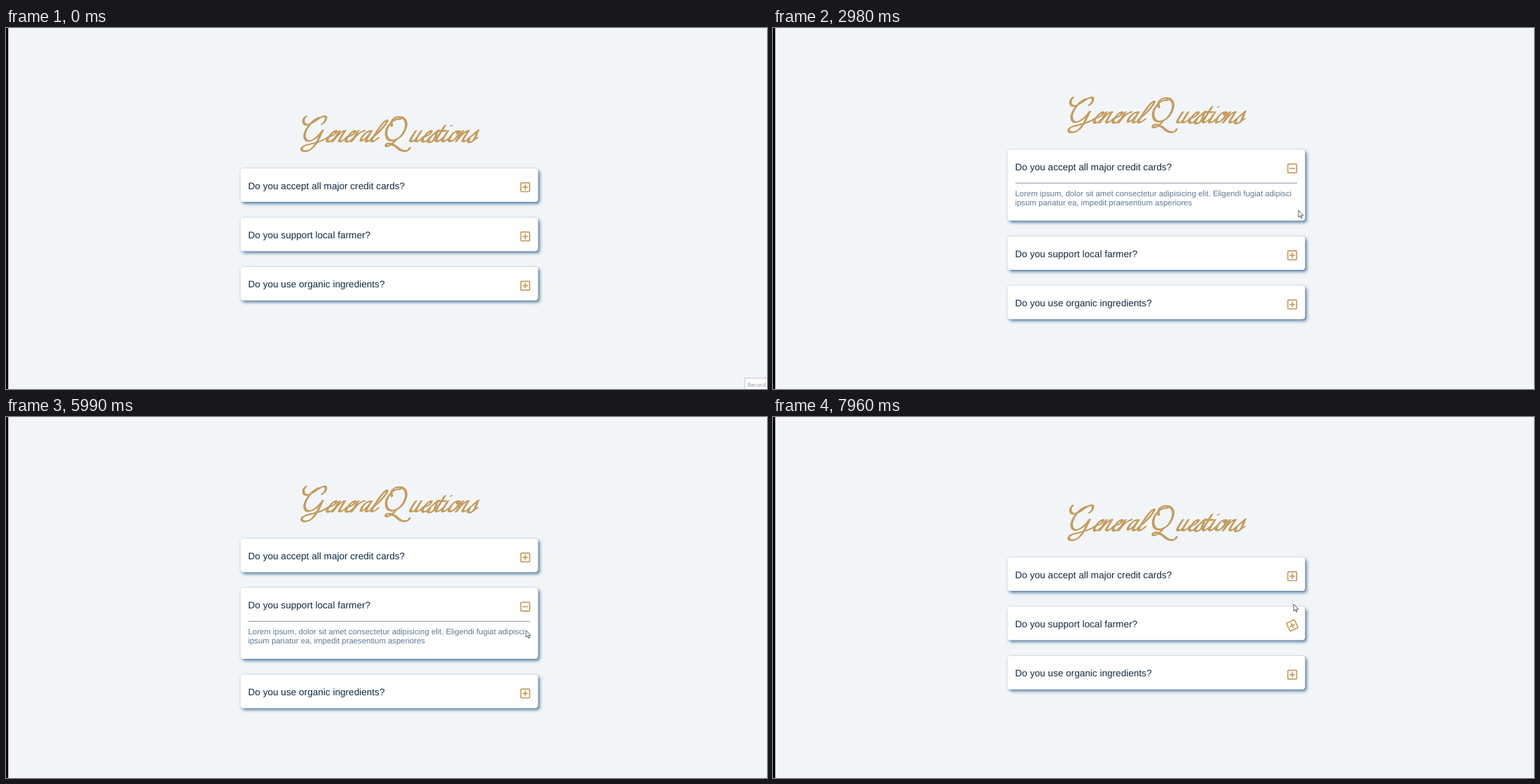
Animation, 1086 px wide and 515 px high, one loop 8000 ms. Source, as an HTML page:

```html
<!DOCTYPE html>
<html lang="en">
<head>
<meta charset="utf-8">
<title>General Questions</title>
<style>
  html, body { margin: 0; height: 100%; overflow: hidden; background: #f1f5f8; }
  svg { display: block; width: 100vw; height: 100vh; }
  text { font-family: "Liberation Sans", Arial, sans-serif; text-rendering: geometricPrecision; }
  .ask { font-size: 13.6px; fill: #102a42; }
  .answer text { font-size: 11.36px; fill: #5d7a98; }
  .answer path { stroke: #8b97a3; }
  .icon { fill: none; stroke: #c59d5f; stroke-width: 1.7; }
  #title { fill: none; stroke: #c59d5f; stroke-width: 1.4; stroke-linecap: round; stroke-linejoin: round; }
  #cursor path { fill: #fff; stroke: #333; stroke-width: .8; stroke-linejoin: round; }
  #press { fill: #ffff4a; mix-blend-mode: multiply; }
  #tag text { font: 8px "Open Sans", sans-serif; fill: #8d939b; }
</style>
</head>
<body>
<svg viewBox="0 0 1086 515">
  <defs>
    <filter id="shadow" x="-5%" y="-20%" width="110%" height="150%">
      <feDropShadow dx="0" dy="0" stdDeviation="1" flood-color="#3d5b78" flood-opacity=".25"/>
      <feDropShadow dx="2.5" dy="2.7" stdDeviation="2" flood-color="#4d7399" flood-opacity=".9"/>
    </filter>
    <g id="lettering"></g>
  </defs>
  <rect width="1086" height="515" fill="#f1f5f8"/>
  <rect width="3.2" height="515"/>
  <g id="title" role="img" aria-label="General Questions"></g>
  <g id="cards"></g>
  <g id="tag">
    <rect x="1054.5" y="499.5" width="40" height="20" fill="#fff" stroke="#c5cbdc"/>
    <text x="1058" y="512">Record</text>
  </g>
  <circle id="press" r="7.8"/>
  <g id="cursor">
    <path id="arrow" d="M0 0V9.8L2.2 7.8 3.8 11.3 5.3 10.6 3.8 7.2H6.8Z"/>
    <path id="hand" d="M-1 1Q0-.6 1 1V5L5 6Q6.3 6.4 6 8.5L4.6 13H-1L-4 8.5Q-4.2 6.4-2.4 7L-1 8.2Z"/>
  </g>
</svg>
<script>
const LOOP = 8000, GLIDE = 500, TURN = 300, PRESS = 170;
const $ = id => document.getElementById(id);
const clamp = v => Math.max(0, Math.min(1, v));
const ease = p => p * p * (3 - 2 * p);
const show = (el, on) => el.setAttribute('visibility', on ? 'visible' : 'hidden');
const move = (el, x, y, more = '') => el.setAttribute('transform', `translate(${x} ${y})${more}`);

// Script letters share a closing cup and are drawn upright, then slanted
const CUP = 'v9c0 6 4 7 7 0';
const GLYPHS = {
  e: [9, 'M1-6C9-7 9-14 6-14S0-1 5 0S9-3 11-5'],
  n: [15, `M2-14V0C3-9 6-14 8-14S9-12 9-14${CUP}`],
  r: [10, 'M2-14V0C3-9 6-14 10-14'],
  a: [14, `M9-13C4-16 1-9 2-4S7 0 9-10V-14${CUP}`],
  l: [8, 'M1-5C7-12 9-27 6-28S2-18 2-5c0 6 4 7 7 0'],
  u: [15, `M2-14v9c0 6 6 7 7 0v-9${CUP}`],
  s: [9, 'M1-5L6-15C6-9 10-5 8-1S0 0 2-3M7 0l4-5'],
  t: [8, 'M2-21v16c0 6 4 7 7 0M-2-14h9'],
  i: [8, `M2-14${CUP}M2-21h.1`],
  o: [11, 'M8-13C3-16 1-9 2-4S9 1 10-6S8-15 7-13s3 3 5 1']
};
const CAPITALS =
  'M428 126C422 131 424 139 431 138S447 127 453 126S457 133 451 137' +
  'M446 128C434 133 423 150 427 158S444 158 452 146C447 156 441 172 431 175S419 171 426 168S449 164 459 156' +
  'M563 130C553 128 540 142 543 154S563 160 569 146S567 126 559 127S548 135 551 140' +
  'M558 158C552 166 542 172 542 167S554 166 559 171S574 178 576 171';

function word(left, letters) {
  let x = 0;
  const paths = [...letters].map(c => {
    const [advance, d] = GLYPHS[c];
    x += advance;
    return `<path transform="translate(${x - advance})" d="${d}"/>`;
  });
  return `<g transform="translate(${left} 162) skewX(-32) scale(1.12 1.08)">${paths.join('')}</g>`;
}
$('lettering').innerHTML = `<path d="${CAPITALS}"/>` + word(454, 'eneral') + word(573, 'uestions');
// Copies along a slanted nib give thick downstrokes and thin upstrokes
$('title').innerHTML = [-1, -.5, 0, .5, 1]
  .map(k => `<use href="#lettering" x="${1.1 * k}" y="${-.5 * k}"/>`).join('');

const QUESTIONS = [
  'Do you accept all major credit cards?',
  'Do you support local farmer?',
  'Do you use organic ingredients?'
];
$('cards').innerHTML = QUESTIONS.map(q => `<g>
  <rect class="box" x="334.8" width="424.4" rx="4" fill="#fff" filter="url(#shadow)"/>
  <text class="ask" x="345.5" y="29.6">${q}</text>
  <g class="icon"><rect x="-6.3" y="-6.3" width="12.6" height="12.6" rx="1.2"/>
    <path d="M-4 0H4"/><path class="bar" d="M0-4V4"/></g>
  <g class="answer"><path d="M346 47.6H748"/>
    <text x="345.5" y="65.9">Lorem ipsum, dolor sit amet consectetur adipisicing elit. Eligendi fugiat adipisci</text>
    <text x="345.5" y="79">ipsum pariatur ea, impedit praesentium asperiores</text></g>
</g>`).join('');
const cards = [...$('cards').children].map(root => {
  const find = name => root.querySelector('.' + name);
  return { root, box: find('box'), icon: find('icon'), bar: find('bar'), answer: find('answer') };
});

const CLOSED = 47.5, EXTRA = 53.7, GAP = 22.7, ICON_X = 741, ICON_Y = 26.7;
const CLICKS = [2470, 5520, 7880];
// Pointer stops: arrival time, x, y
const STOPS = [
  [990, 952, 379], [2140, 744, 229], [2980, 750, 260], [3730, 742, 326], [4490, 753, 353],
  [5000, 742, 328], [6200, 742, 290], [6600, 741, 273], [7200, 740, 300], [7700, 743, 267]
];

function pointer(t) {
  let x = 1074, y = 530;
  for (const [end, toX, toY] of STOPS) {
    const k = ease(clamp((t - end) / GLIDE + 1));
    x += (toX - x) * k;
    y += (toY - y) * k;
  }
  return [x, y];
}

// The first click opens card 0, the second card 1, the third closes it
const openCard = t => [-1, 0, 1, -1][CLICKS.filter(c => t >= c).length];
const lift = open => open < 0 ? 0 : -EXTRA / 2;
const cardTop = (i, open) =>
  200.5 + lift(open) + i * (CLOSED + GAP) + (open >= 0 && i > open ? EXTRA : 0);

function hovers(i, t) {
  const [x, y] = pointer(t);
  const iconY = cardTop(i, openCard(t)) + ICON_Y;
  return Math.max(Math.abs(x - ICON_X), Math.abs(y - iconY)) < 12;
}

// A linear transition equals the share of the last TURN ms spent hovering
function turn(i, t) {
  const samples = 60;
  let hits = 0;
  for (let k = 0; k < samples; k++) hits += hovers(i, t - TURN * k / samples);
  return 90 * hits / samples;
}

function draw(t) {
  const open = openCard(t);
  const turns = cards.map((_, i) => turn(i, t));
  move($('title'), 0, lift(open));
  cards.forEach((card, i) => {
    const isOpen = i === open;
    move(card.root, 0, cardTop(i, open));
    card.box.setAttribute('height', CLOSED + (isOpen ? EXTRA : 0));
    move(card.icon, ICON_X, ICON_Y, ` rotate(${turns[i]})`);
    show(card.bar, !isOpen);
    show(card.answer, isOpen);
  });

  const [x, y] = pointer(t), hand = turns.includes(90);
  $('tag').setAttribute('opacity', t < 70 ? 1 : t < 120 ? .5 : 0);
  move($('cursor'), x, y);
  move($('press'), x - 1.5, y - 2);
  show($('press'), CLICKS.some(c => t >= c - PRESS && t < c));
  show($('hand'), hand);
  show($('arrow'), !hand);
}

const start = performance.now();
function tick() {
  draw((performance.now() - start) % LOOP);
  requestAnimationFrame(tick);
}
tick();
</script>
</body>
</html>
```
